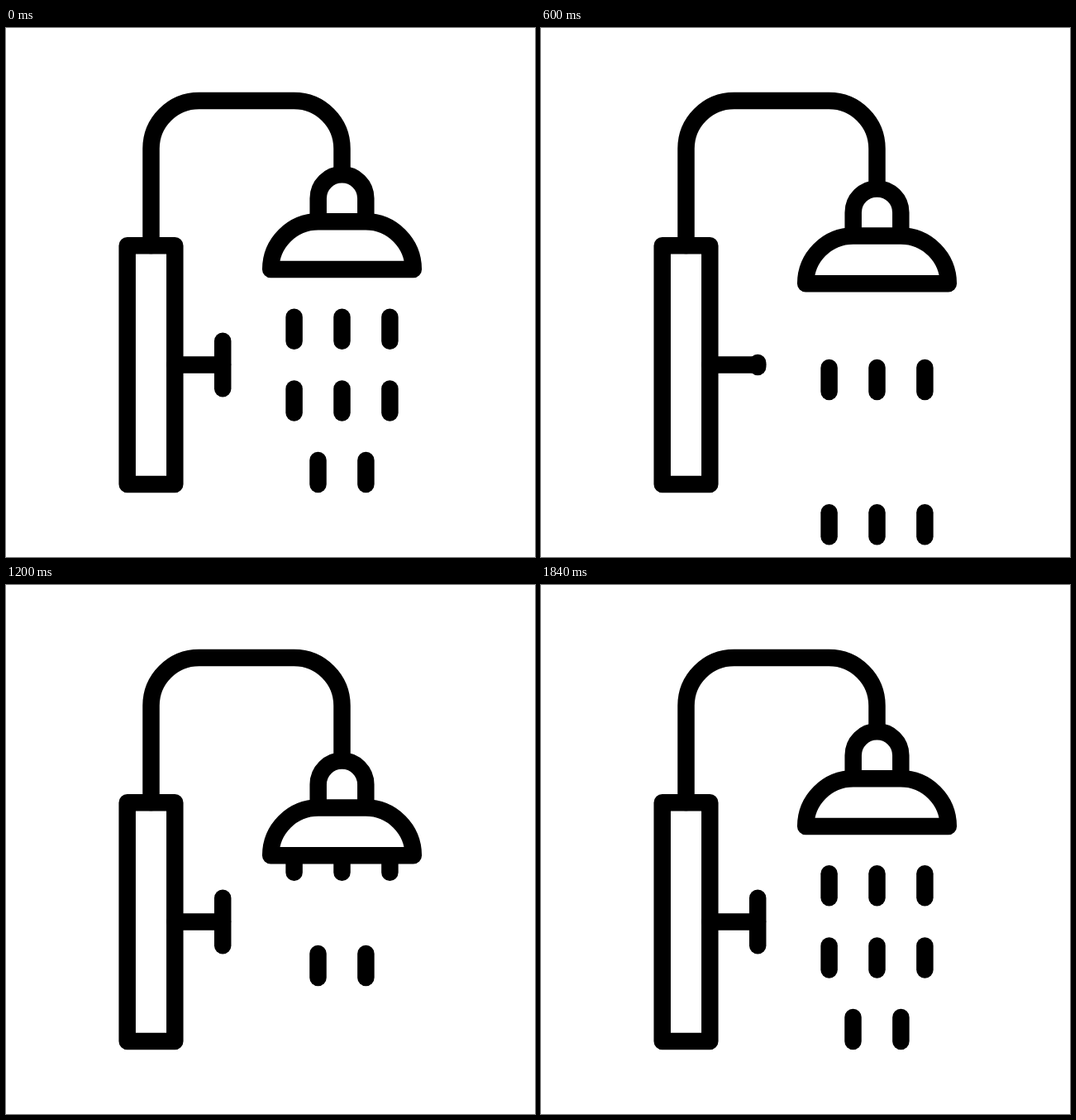
These frames come from a looping animation (640x640 px, 1.92 s). An HTML page with a canvas:

```html
<!DOCTYPE html>
<html lang="en">
<head>
<meta charset="utf-8">
<title>Shower</title>
<style>
  html, body { margin: 0; width: 100%; height: 100%; overflow: hidden; background: #fff; }
  canvas { display: block; }
</style>
</head>
<body>
<canvas id="stage" width="640" height="640"></canvas>
<script>
const ctx = document.getElementById('stage').getContext('2d');
const LOOP = 1920, STEP = 40, RESET = 900;
const HEAD_DROP = 38.7, HEAD_BASE = 292;

// y = top of the drop's line, out = time it starts to fall, home = time it settles
const rows = [
  { y: 349.7, xs: [348.6, 406.5, 464.4], out: 255, home: 1932 },
  { y: 436.4, xs: [348.6, 406.5, 464.4], out: 135, home: 1808 },
  { y: 523, xs: [377.5, 435.4], out: 53, home: 1728 }
];

const span = (t, from, to) => Math.min(1, Math.max(0, (t - from) / (to - from)));
const easeInOut = x => x < .5 ? 4 * x ** 3 : 1 - 4 * (1 - x) ** 3;

function stroke(path, fill) {
  const shape = new Path2D(path);
  if (fill) ctx.fill(shape);
  ctx.stroke(shape);
}

function dropShift(row, t) {
  return t < RESET
    ? 1.49e-6 * Math.max(0, t - row.out) ** 3
    : -5.23e-7 * Math.max(0, row.home - t) ** 3;
}

function drawDrops(t, top) {
  ctx.save();
  ctx.beginPath();
  ctx.rect(0, top, 640, 640 - top);
  ctx.clip();
  for (const row of rows) {
    const y = row.y + dropShift(row, t);
    for (const x of row.xs) stroke(`M${x} ${y}v29`);
  }
  ctx.restore();
}

function drawHead(shift) {
  stroke(`M175.5 263V146A58 58 0 0 1 233.5 88H348.5A58 58 0 0 1 406.5 146V${177 + shift}`);
  ctx.save();
  ctx.translate(0, shift);
  stroke('M377.7 234V206A28.8 28.8 0 0 1 435.3 206V234', true);
  stroke('M320.2 292A57.7 57.7 0 0 1 377.9 234.3H435.1A57.7 57.7 0 0 1 492.8 292Z', true);
  ctx.restore();
}

function drawValve(t) {
  // the handle makes half a turn, seen from the side
  const half = 28.7 * Math.abs(Math.cos(Math.PI * span(t, 114, 1144)));
  stroke('M146.7 263.3H204.3V552H146.7Z');
  stroke('M204.3 407.5H262');
  stroke(`M262.2 ${407.5 - half}v${2 * half + .01}`);
}

function draw(t) {
  ctx.fillStyle = '#fff';
  ctx.fillRect(0, 0, 640, 640);
  ctx.strokeStyle = '#000';
  ctx.lineWidth = 20.5;
  ctx.lineCap = ctx.lineJoin = 'round';

  const lowered = easeInOut(span(t, 267, 960)) - easeInOut(span(t, 1005, 1698));
  const shift = HEAD_DROP * lowered;
  drawDrops(t, HEAD_BASE + shift);
  drawHead(shift);
  drawValve(t);
}

const start = performance.now();
function tick() {
  const t = (performance.now() - start) % LOOP;
  const stepped = Math.floor(t / STEP) * STEP;
  draw(stepped > 1840 ? 0 : stepped);
  requestAnimationFrame(tick);
}
tick();
</script>
</body>
</html>
```
